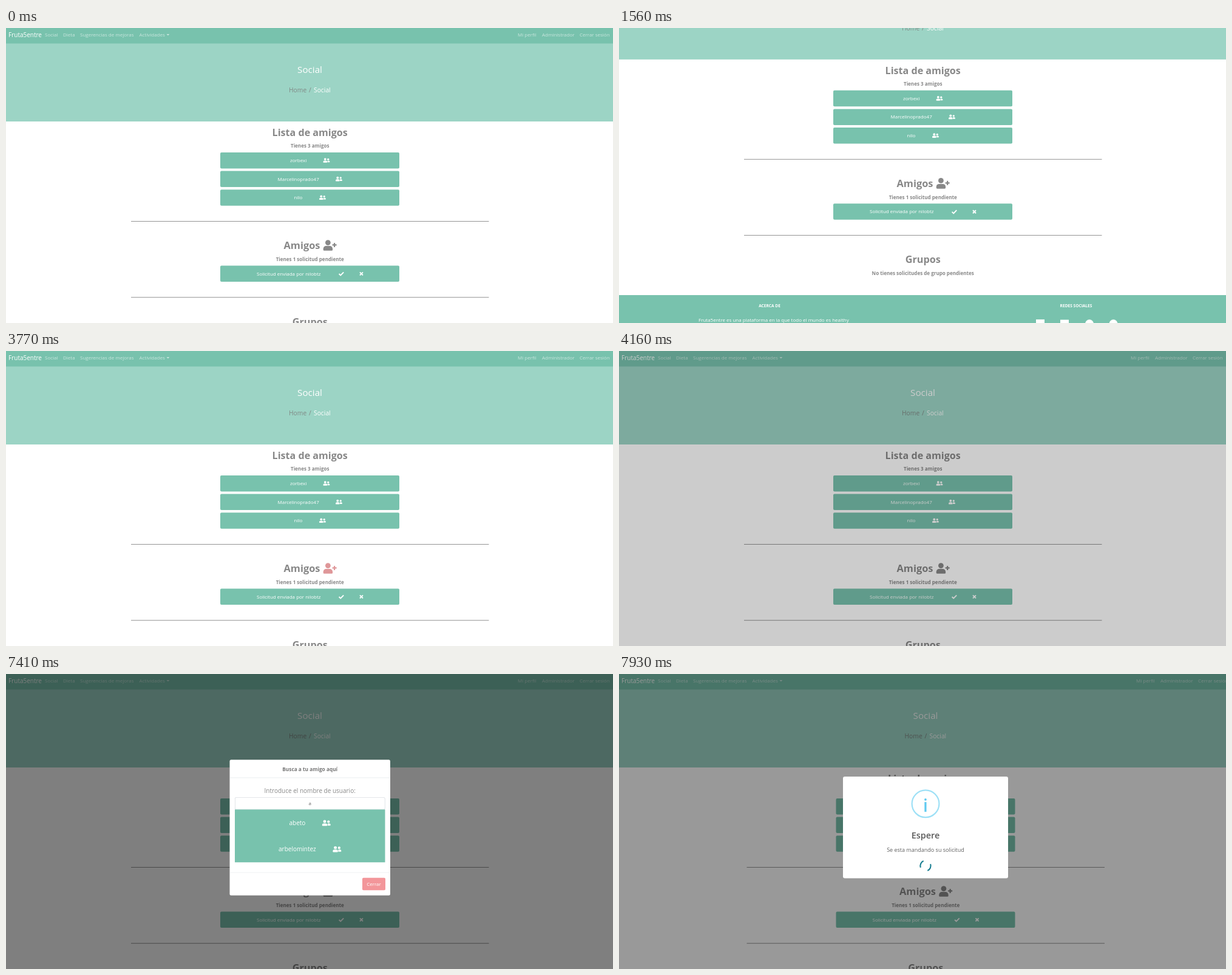
An HTML page with a canvas for the animation above (8 s loop, 1000x486 px).

```html
<!DOCTYPE html>
<html lang="es">
<head>
<meta charset="utf-8">
<title>Social</title>
<style>
  html, body { margin: 0; width: 100%; height: 100%; overflow: hidden; background: #fff; }
  canvas { display: block; width: 1000px; height: 486px; }
</style>
</head>
<body>
<canvas id="stage"></canvas>
<script>
const W = 1000, H = 486, LOOP = 8000, STEP = 130;
const TEAL = '#78c2ad', PALE = '#9cd4c5', PINK = '#f3969a', GREY = '#888', WHITE = '#fff';
const BRAND = 'Fruta5entre';
const MAX_SCROLL = 126.5;

const canvas = document.getElementById('stage');
const ctx = canvas.getContext('2d');
const dpr = window.devicePixelRatio || 1;
canvas.width = W * dpr;
canvas.height = H * dpr;

const ramp = (t, start, length) => Math.min(1, Math.max(0, (t - start) / length));
const easeOut = p => 1 - (1 - p) * (1 - p);
const easeInOut = p => p * p * (3 - 2 * p);

function text(str, x, y, size, color, align = 'left', weight = 400) {
  ctx.font = `${weight} ${size}px "Open Sans", "Noto Sans", sans-serif`;
  ctx.textAlign = align;
  ctx.fillStyle = color;
  ctx.fillText(str, x, y);
}

function rect(x, y, w, h, color) {
  ctx.fillStyle = color;
  ctx.fillRect(x, y, w, h);
}

function box(x, y, w, h, r, color) {
  ctx.fillStyle = color;
  ctx.beginPath();
  ctx.roundRect(x, y, w, h, r);
  ctx.fill();
}

function disc(x, y, r, color) {
  ctx.fillStyle = color;
  ctx.beginPath();
  ctx.arc(x, y, r, 0, 7);
  ctx.fill();
}

function stroke(points, width, color) {
  ctx.strokeStyle = color;
  ctx.lineWidth = width;
  ctx.beginPath();
  points.forEach(([x, y]) => ctx.lineTo(x, y));
  ctx.stroke();
}

// Icons are drawn on a 640 x 512 grid centred on (x, y).
function icon(x, y, width, draw) {
  ctx.save();
  ctx.translate(x, y);
  ctx.scale(width / 640, width / 640);
  ctx.translate(-320, -256);
  draw();
  ctx.restore();
}

function friends(x, y, width) {
  icon(x, y, width, () => {
    disc(192, 146, 112, WHITE);
    box(0, 288, 384, 192, [115, 115, 48, 48], WHITE);
    disc(480, 160, 96, WHITE);
    box(408, 288, 232, 160, [60, 112, 48, 10], WHITE);
  });
}

function addUser(x, y, width, color) {
  icon(x, y, width, () => {
    disc(224, 128, 128, color);
    box(0, 288, 448, 224, [134, 134, 48, 48], color);
    box(432, 208, 208, 64, 16, color);
    box(504, 136, 64, 208, 16, color);
  });
}

function button(y) {
  box(353, y, 295, 26.5, 2, TEAL);
}

function navbar(extra) {
  const soft = 'rgba(255,255,255,.6)';
  rect(0, 0, W + 10, 25.5, TEAL);
  text(BRAND, 4, 15, 10, WHITE);
  text('Social', 64, 14, 8, soft);
  text('Dieta', 94, 14, 8, soft);
  text('Sugerencias de mejoras', 122, 14, 8, soft);
  text('Actividades', 219.5, 14, 8, soft);
  ctx.beginPath();
  ctx.moveTo(264.5, 10);
  ctx.lineTo(269.3, 10);
  ctx.lineTo(266.9, 12.5);
  ctx.fill();
  text('Mi perfil', 843 + extra, 14, 8, soft);
  text('Administrador', 883 + extra, 14, 8, soft);
  text('Cerrar sesión', 945 + extra, 14, 8, soft);
}

function content(iconColor) {
  text('Social', 500.5, 73.5, 15.2, WHITE, 'center');
  text('Home', 466, 106, 10.3, '#808885');
  text('/', 499, 106, 10.3, '#808885');
  text('Social', 507, 106, 10.3, WHITE);

  text('Lista de amigos', 500.7, 177.7, 16.1, GREY, 'center', 700);
  text('Tienes 3 amigos', 500.7, 197.4, 8.05, GREY, 'center', 700);
  const rows = [['zorbexi', 468, 528], ['Marcelinoprado47', 447.5, 548.5], ['nilo', 474.5, 521.5]];
  rows.forEach(([name, x, iconX], i) => {
    const y = 205 + i * 30.6;
    button(y);
    text(name, x, y + 15.9, 8, WHITE);
    friends(iconX, y + 13, 11);
  });
  rect(206, 318, 589.5, 0.9, GREY);

  text('Amigos', 457.5, 364.2, 16.4, GREY, 'left', 700);
  addUser(533.7, 358, 22, iconColor);
  text('Tienes 1 solicitud pendiente', 500.7, 384, 8.05, GREY, 'center', 700);
  button(391.5);
  text('Solicitud enviada por nilobtz', 413, 407.6, 8, WHITE);
  stroke([[548.6, 405], [551.2, 407.5], [556.2, 402.3]], 1.9, WHITE);
  stroke([[583, 402.4], [588, 407.4]], 1.9, WHITE);
  stroke([[588, 402.4], [583, 407.4]], 1.9, WHITE);
  rect(206, 443.3, 589.5, 0.9, GREY);

  text('Grupos', 500.8, 489.5, 16.2, GREY, 'center', 700);
  text('No tienes solicitudes de grupo pendientes', 500.7, 509.5, 8.05, GREY, 'center', 700);
}

function footer() {
  rect(0, 542.2, W + 10, 80, TEAL);
  text('ACERCA DE', 248, 562.4, 6.6, WHITE, 'center', 700);
  text(BRAND + ' es una plataforma en la que todo el mundo es healthy', 131, 586.3, 8, WHITE);
  text('REDES SOCIALES', 753, 562.4, 6.6, WHITE, 'center', 700);
  rect(687, 582.3, 14, 14, WHITE);
  rect(727, 582.8, 14, 14, WHITE);
  disc(775, 589.5, 7, WHITE);
  disc(814.5, 589.5, 7, WHITE);
}

function page(scroll, wide, iconColor) {
  rect(0, 0, W, H, WHITE);
  ctx.save();
  ctx.translate(0, -scroll);
  rect(0, 25, W + 10, 129, PALE);
  navbar(wide ? 9 : 0);
  if (wide) ctx.translate(4.5, 0);
  content(iconColor);
  if (wide) ctx.translate(-4.5, 0);
  footer();
  ctx.restore();
}

function modal(shown, ring, typed, results) {
  const h = results ? 223.5 : 136.5;
  const mid = 500.7;
  ctx.save();
  ctx.globalAlpha = Math.min(1, shown * 2);
  ctx.translate(0, 253 - h / 2 - 26 * (1 - easeOut(shown)));
  box(368.5, 0, 264.5, h, 2.5, WHITE);
  text('Busca a tu amigo aquí', mid, 18.6, 8.3, '#777', 'center', 700);
  rect(369, 29.4, 263.5, 0.6, '#dee2e6');
  text('Introduce el nombre de usuario:', mid, 55.2, 10, GREY, 'center');

  if (ring) box(375.2, 60.2, 251, 23.6, 3, `rgba(120,194,173,${0.32 * ring})`);
  box(377, 62, 247.5, 20, 2, ring ? '#bfe2d8' : '#ced4da');
  box(377.6, 62.6, 246.3, 18.8, 1.6, WHITE);
  if (typed) text('a', mid, 74.6, 8, '#666', 'center');
  else text('Usuario', mid, 74.8, 8, GREY, 'center');

  if (results) {
    rect(377, 82, 247.5, 87, TEAL);
    text('abeto', 466.5, 108, 10, WHITE);
    friends(527.8, 104.2, 14);
    text('arbelomintez', 449, 151, 10, WHITE);
    friends(545.4, 147.3, 14);
  }

  rect(369, h - 38, 263.5, 0.6, '#e6e9ec');
  box(587, h - 29, 38, 20.5, 2, PINK);
  text('Cerrar', 606, h - 15.8, 8, WHITE, 'center');
  ctx.restore();
}

function waitAlert(t) {
  const mid = 505;
  box(369, 169, 272, 167.5, 3, WHITE);
  ctx.strokeStyle = '#9de0f6';
  ctx.lineWidth = 2.2;
  ctx.beginPath();
  ctx.arc(mid, 213.8, 22.4, 0, 7);
  ctx.stroke();
  text('i', mid, 227, 28, '#5fcaf0', 'center', 600);
  text('Espere', mid, 271.2, 14.4, '#595959', 'center', 600);
  text('Se esta mandando su solicitud', mid, 293.2, 9, '#606060', 'center');

  const turn = (t - 7830) / 1500 * Math.PI * 2;
  ctx.strokeStyle = '#1b7f92';
  ctx.lineWidth = 2.1;
  for (const side of [0, Math.PI]) {
    ctx.beginPath();
    ctx.arc(mid, 316, 8.6, turn + side - 0.75, turn + side + 0.75);
    ctx.stroke();
  }
}

function draw(t) {
  const scroll = MAX_SCROLL * (easeOut(ramp(t, 1240, 570)) - easeInOut(ramp(t, 2330, 400)));
  const hover = t >= 3770 && t < 4160;
  const iconColor = !hover ? GREY : t < 3900 ? '#df9799' : PINK;
  const alert = t >= 7830;
  const dim = alert ? 0.4 : 0.5 * (ramp(t, 4100, 150) - ramp(t, 7700, 150));
  const shown = ramp(t, 4250, 300) - ramp(t, 7440, 200);
  const ring = t < 7280 ? ramp(t, 4745, 130) : 0;

  ctx.setTransform(dpr, 0, 0, dpr, 0, 0);
  page(scroll, alert, iconColor);
  if (dim > 0) rect(0, 0, W, H, `rgba(0,0,0,${dim})`);
  if (shown > 0) modal(shown, ring, t >= 6110, t >= 6240);
  if (alert) waitAlert(t);
}

function tick() {
  const t = performance.now() % LOOP;
  draw(Math.floor(t / STEP) * STEP);
  requestAnimationFrame(tick);
}
tick();
</script>
</body>
</html>
```
